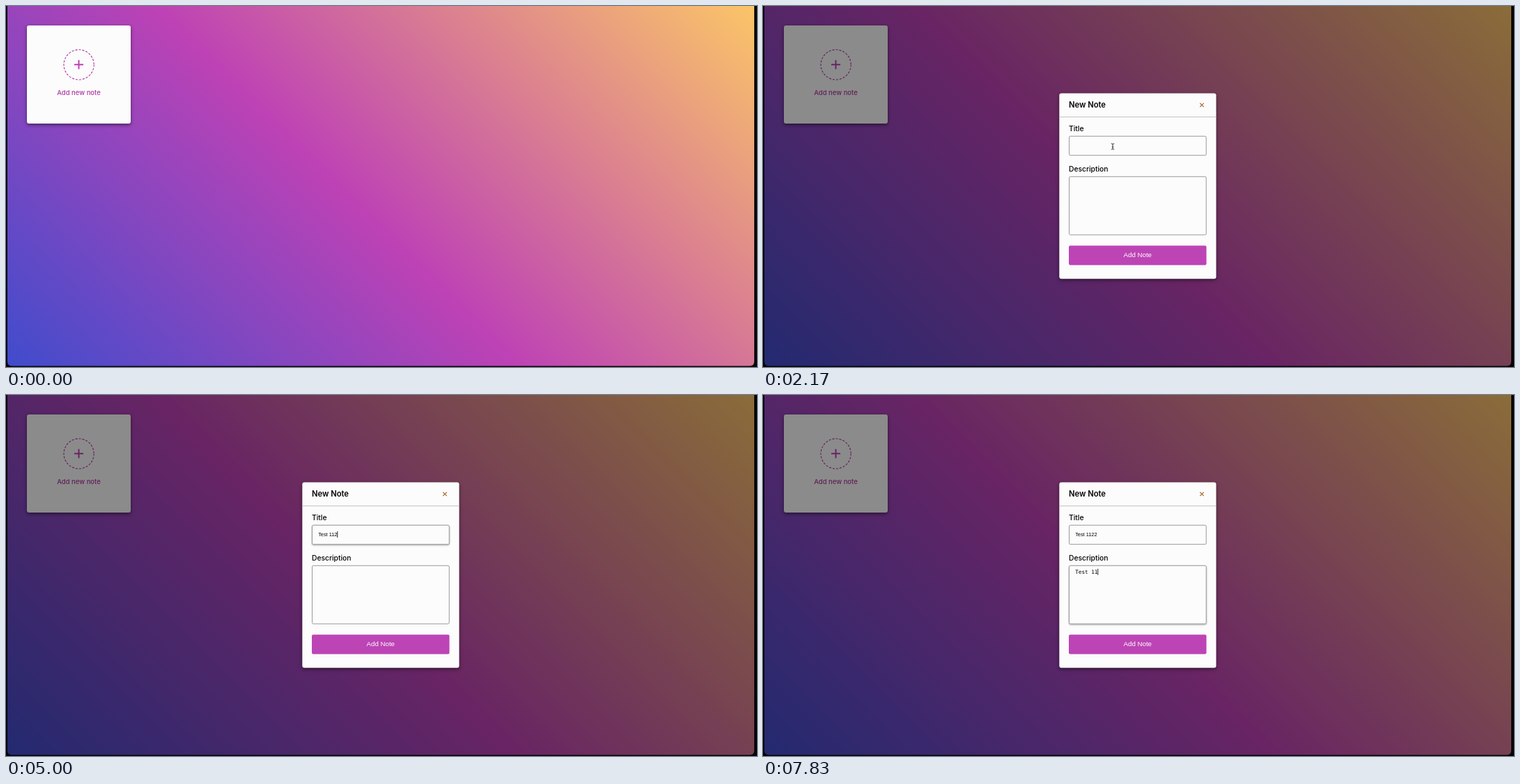
Animation, 1078 px wide and 519 px high, one loop 8000 ms. Source, as an HTML page:

```html
<!DOCTYPE html>
<html lang="en">
<head>
<meta charset="utf-8">
<title>Add a note</title>
<style>
  html, body { margin: 0; width: 100%; height: 100%; overflow: hidden; background: #080808; }
  svg { display: block; width: 1078px; height: 519px; }
  text { font-family: Inter, "Open Sans", sans-serif; white-space: pre; }
  .ui { font-family: "Liberation Sans", Arial, sans-serif; }
  .mono { font-family: "DejaVu Sans Mono", monospace; }
  .accent { fill: #ad389f; }
  .paper { fill: #fcfcfc; }
  .card { filter: drop-shadow(0 2.5px 2.5px rgba(0, 0, 0, .5)); }
  .field { fill: #fcfcfc; stroke: #999; stroke-width: 1; }
  .field.focus { filter: drop-shadow(0 1.5px 1px rgba(0, 0, 0, .32)); }
  .caret { fill: #111; }
  .cursor { stroke-linejoin: round; stroke-linecap: round; }
</style>
</head>
<body>
<svg viewBox="0 0 1078 519">
  <defs>
    <linearGradient id="sky" gradientUnits="userSpaceOnUse" x1="140.5" y1="656.5" x2="935.5" y2="-138.5">
      <stop offset="0" stop-color="#404ccc"/>
      <stop offset=".46" stop-color="#bd42b5"/>
      <stop offset="1" stop-color="#fbc568"/>
    </linearGradient>
  </defs>

  <path fill="url(#sky)" d="M2 0H1074V511Q1074 517.5 1067.5 517.5H8.5Q2 517.5 2 511Z"/>

  <rect class="paper card" x="30" y="28" width="149" height="141" rx="3"/>
  <circle cx="104.6" cy="84.4" r="21.6" fill="none" stroke="#ad389f" stroke-width="1.1" stroke-dasharray="3.1 1.95"/>
  <path d="M98 84.3H111M104.5 77.8V90.8" stroke="#bd42b5" stroke-width="2"/>
  <text class="accent" x="104.5" y="128" font-size="9.5" font-weight="500" text-anchor="middle">Add new note</text>

  <g id="dialog">
    <rect width="1078" height="519" opacity=".45"/>
    <rect class="paper card" x="425.3" y="125.5" width="225.2" height="266.7" rx="3"/>
    <path d="M425.3 159.5H650.5" stroke="#c4c4c4"/>
    <text x="439" y="146.3" font-size="11.2" font-weight="600">New Note</text>
    <path d="M627.2 139.7L632.7 145.2M632.7 139.7L627.2 145.2" stroke="#a3652c" stroke-width="1.2"/>
    <text x="439" y="179.7" font-size="10.3" font-weight="500">Title</text>
    <rect class="field" id="titleBox" x="439.5" y="187.2" width="196.7" height="27.5" rx="1.8"/>
    <text class="ui" id="titleText" x="448.2" y="203.3" font-size="7.35"></text>
    <text x="439" y="237.7" font-size="10.3" font-weight="500">Description</text>
    <rect class="field" id="noteBox" x="439.5" y="245.3" width="196.7" height="83.7" rx="1.8"/>
    <text class="mono" id="noteText" x="448.2" y="257" font-size="7.65"></text>
    <rect class="caret" id="caret" width=".9" height="9"/>
    <rect x="439" y="344.5" width="197.5" height="28" rx="2" fill="#bd44b5"/>
    <text class="ui" x="537.8" y="361.4" font-size="9.7" fill="#fff" text-anchor="middle">Add Note</text>
  </g>

  <!-- each cursor has its hot spot at 0,0 -->
  <path class="cursor" id="arrow" fill="#000" stroke="#fff" stroke-width=".6"
        d="M0 0V7.2L1.7 5.6L2.8 8.1L4.1 7.5L3 5.1H5.2Z"/>
  <path class="cursor" id="hand" fill="#fff" stroke="#111" stroke-width=".9"
        d="M-1.6 .6Q-1 -.6 0 .4L.8 3.3V2.7Q1.7 2 2.4 2.7Q3.4 2.1 4 3Q5.4 2.6 5.6 4.2Q5.9 6.3 4.9 7.8L4.7 9.3H.8Q-.9 7.8 -2.3 6Q-2.6 4.6 -1 5.1L-.4 5.5Z"/>
  <path class="cursor" id="beam" fill="none" stroke="#222" stroke-width=".9"
        d="M-1.8 -4.2Q0 -4.2 0 -3.2Q0 -4.2 1.8 -4.2M0 -3.2V3.2M-1.8 4.2Q0 4.2 0 3.2Q0 4.2 1.8 4.2M-.8 .8H.8"/>
</svg>

<script>
const LOOP = 8000;
const byId = id => document.getElementById(id);
const cursors = ["arrow", "hand", "beam"];

// [start ms, cursor, x, y]
const pointerSteps = [
  [0, null],
  [500, "arrow", 330, 250],
  [670, "arrow", 190, 140],
  [830, "hand", 125, 94],
  [1000, "hand", 113.5, 86.5],
  [1500, "arrow", 113.4, 86],
  [1670, "arrow", 180, 108],
  [1830, "arrow", 340, 165],
  [2000, "beam", 470, 197],
  [2170, "beam", 502, 202],
  [3000, null],
  [5330, "beam", 502, 215],
  [5500, "beam", 502.5, 265],
  [6170, null]
];

// [start ms, focused field, characters typed, caret shown]
const typingSteps = [
  [0, null, 0, false],
  [2670, "title", 0, true],
  [3000, "title", 1, true],
  [3170, "title", 2, true],
  [3330, "title", 3, true],
  [3500, "title", 4, true],
  [4330, "title", 4, false],
  [4500, "title", 6, true],
  [4670, "title", 7, true],
  [5000, "title", 8, true],
  [5170, "title", 9, true],
  [5500, "title", 9, false],
  [5670, "note", 0, true],
  [6000, "note", 0, false],
  [6170, "note", 1, true],
  [6500, "note", 2, true],
  [6670, "note", 3, true],
  [7000, "note", 4, true],
  [7330, "note", 5, true],
  [7500, "note", 6, true],
  [7830, "note", 7, true]
];

const content = "Test 1122";
const caretTop = { title: 196, note: 249.8 };
const stepAt = (steps, t) => steps.findLast(([start]) => start <= t);

function drawPointer(t) {
  const [, kind, x, y] = stepAt(pointerSteps, t);
  for (const id of cursors) {
    byId(id).style.display = id === kind ? "" : "none";
  }
  if (kind) byId(kind).setAttribute("transform", `translate(${x} ${y})`);
}

function drawTyping(t) {
  const [, focus, count, caretOn] = stepAt(typingSteps, t);
  const typed = {
    title: focus === "title" ? count : focus === "note" ? content.length : 0,
    note: focus === "note" ? count : 0
  };
  for (const name of ["title", "note"]) {
    byId(name + "Text").textContent = content.slice(0, typed[name]);
    byId(name + "Box").classList.toggle("focus", focus === name);
  }
  const caret = byId("caret");
  caret.style.display = caretOn ? "" : "none";
  if (caretOn) {
    const width = count ? byId(focus + "Text").getComputedTextLength() : 0;
    caret.setAttribute("x", 448.1 + width);
    caret.setAttribute("y", caretTop[focus]);
  }
}

const origin = performance.now();
function render() {
  const t = (performance.now() - origin) % LOOP;
  byId("dialog").style.display = t >= 1500 ? "" : "none";
  drawTyping(t);
  drawPointer(t);
  requestAnimationFrame(render);
}
render();
</script>
</body>
</html>
```
